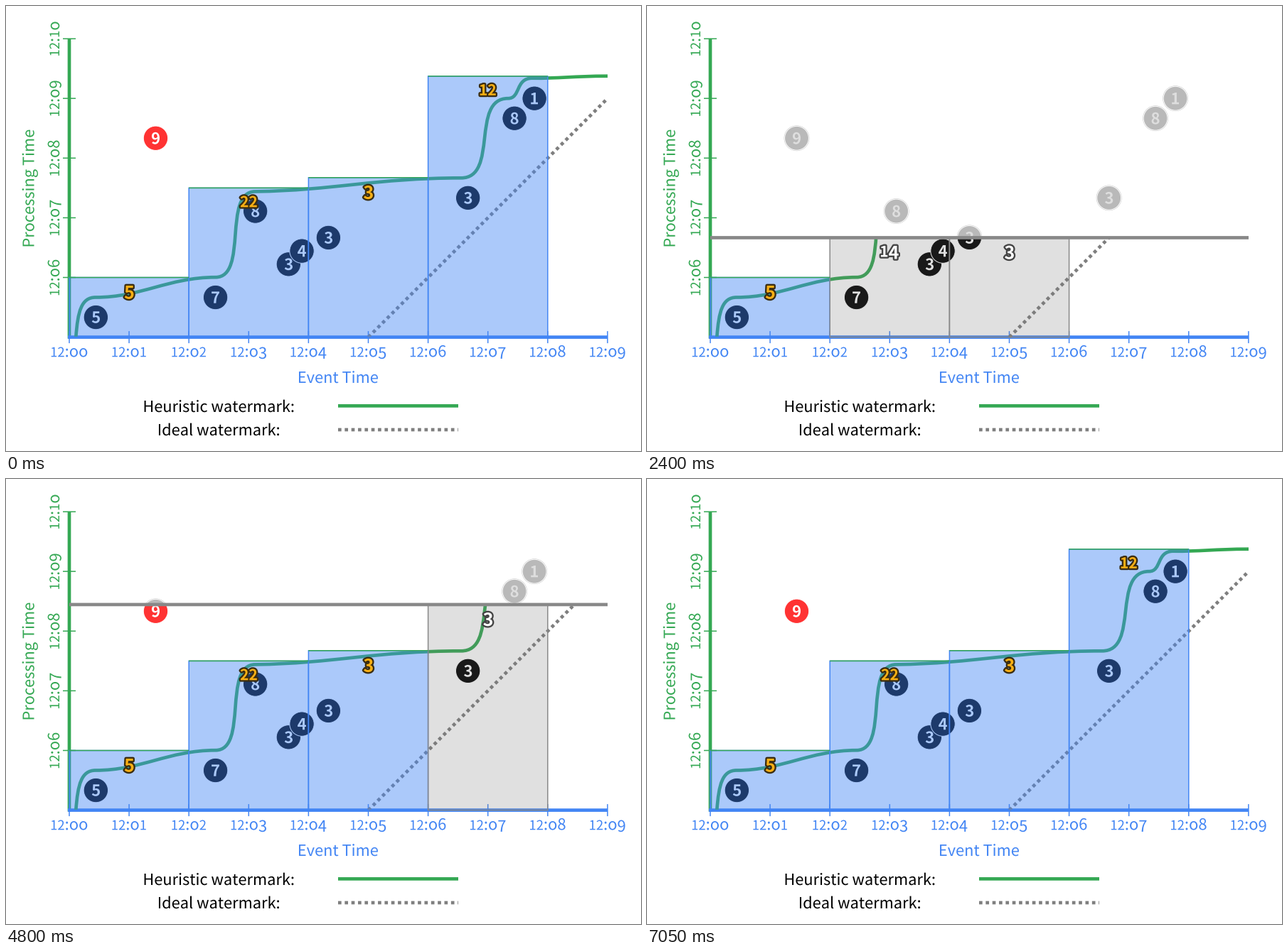
Animation of 893 by 627 pixels, one loop 8000 ms. Source, as a matplotlib script:

```python
import matplotlib.pyplot as plt
from matplotlib.animation import FuncAnimation
from matplotlib.patches import Circle, PathPatch, Rectangle
from matplotlib.patheffects import withStroke
from matplotlib.path import Path
from matplotlib.textpath import TextPath
from matplotlib.transforms import Affine2D

W, H, DPI = 893, 627, 64
PT = 72 / DPI                   # points per pixel
X0, Y0, MINUTE = 89, 466.6, 84.1
UNIT = MINUTE / 9               # the bar climbs one unit per step
THICK, THIN = UNIT / 2, 1.5
RIGHT, TOP = 846, Y0 - 45 * UNIT
STEP_MS, TICK_MS, LOOP_MS = 150, 50, 8000
LAST_STEP = 47

GREEN, BLUE, GREY = "#34a853", "#4285f4", "#888888"
FONT = "Noto Sans CJK JP"

# value, event time and arrival in units, window index (None: too late)
SAMPLES = [
    (5, 4, 3, 0), (7, 22, 6, 1), (3, 33, 11, 1), (4, 35, 13, 1),
    (3, 39, 15, 2), (8, 28, 19, 1), (3, 60, 21, 3), (9, 13, 30, None),
    (8, 67, 33, 3), (1, 70, 36, 3),
]
CLOSES = [9, 22.5, 24.06, 39.35]

fig = plt.figure(figsize=(W / DPI, H / DPI), dpi=DPI, facecolor="white")
ax = fig.add_axes([0, 0, 1, 1])
ax.set_xlim(0, W)
ax.set_ylim(H, 0)
ax.axis("off")


def raw(s, size, bold):
    prop = {"family": FONT, "weight": "bold" if bold else "normal"}
    return TextPath((0, 0), s, size=size, prop=prop)


def advance(c, size, bold):
    wide = raw("0" + c + "0", size, bold).get_extents().x1
    return wide - raw("00", size, bold).get_extents().x1


def flip_centred(path):
    box = path.get_extents()
    return Affine2D().translate(-(box.x0 + box.x1) / 2, 0).scale(1, -1).transform_path(path)


def plain(s, size, bold=False):
    return flip_centred(raw(s, size, bold))


def old_style(s, size, bold=False):
    """Digits with old-style heights: low 0-2, hanging 3, 4, 5, 7, 9."""
    parts, x = [], 0
    for c in s:
        scale = 0.84 if c in "12" else 1
        drop = 0.12 * size if c in "34579" else 0
        glyph = "o" if c == "0" else c
        path = raw(glyph, size * scale, bold)
        parts.append(Affine2D().translate(x, -drop).transform_path(path))
        x += advance(glyph, size * scale, bold)
    return flip_centred(Path.make_compound_path(*parts))


def place(path, x, y, color, angle=0, z=5):
    move = Affine2D().rotate_deg(angle).translate(x, y)
    patch = PathPatch(path, fc=color, lw=0, zorder=z, transform=move + ax.transData)
    return ax.add_patch(patch)


def line(xs, ys, color, width, z, **kw):
    kw.setdefault("solid_capstyle", "butt")
    return ax.plot(xs, ys, color=color, lw=width * PT, zorder=z, snap=False, **kw)[0]


def dotted(xs, ys, z):
    return line(xs, ys, "#7f7f7f", THICK, z, ls=(0, (1, 1)), dash_capstyle="butt")


# axes, ticks and their labels
line([X0, X0], [TOP, Y0 + 2], GREEN, THICK, 1)
line([X0 - 2, RIGHT], [Y0, Y0], BLUE, THICK, 1)
for i in range(10):
    x = X0 + i * MINUTE
    line([x, x], [Y0 - 8.5, Y0 + 8.5], BLUE, THIN, 1)
    place(old_style(f"12:0{i}", 22), x, 494.3, BLUE)
for i in range(1, 6):
    y = Y0 - i * MINUTE
    line([X0 - 9, X0 + 9], [y, y], GREEN, THIN, 1)
    place(old_style(f"12:{5 + i:02d}", 22), 75, y, GREEN, -90)
place(plain("Event Time", 21.8), 467.5, 531, BLUE)
place(plain("Processing Time", 21.8), 39.5, 256.5, GREEN, -90)

# legend
place(plain("Heuristic watermark:", 21.8), 299.5, 572, "black")
place(plain("Ideal watermark:", 21.8), 299.5, 605, "black")
line([467, 636], [563.4, 563.4], GREEN, THICK, 1)
dotted([467, 636], [597, 597], 1)

# watermarks, uncovered by the rising bar
knots = [
    (98.3, 466.6),
    (101, 430), (106, 410.5), (126, 410.5),
    (190, 410.5), (228, 382.4), (294.6, 382.2),
    (341, 382.2), (304, 261.4), (350.6, 261.4),
    (460, 260), (520, 242.3), (640, 242.3),
    (693, 242.3), (653, 130.2), (706, 130.2),
    (724, 130.2), (716, 101.7), (740, 101.7),
    (775, 102.3), (800, 98.7), (RIGHT, 98.7),
]
curve = Path(knots, [Path.MOVETO] + [Path.CURVE4] * (len(knots) - 1))
heuristic = ax.add_patch(PathPatch(curve, fc="none", ec=GREEN, lw=THICK * PT,
                                   capstyle="butt", zorder=2))
ideal = dotted([X0 + 5 * MINUTE, RIGHT], [Y0, Y0 - 4 * MINUTE], 2)
below, above = [heuristic, ideal], []


def disc(x, y, r, fill, z, edge="none"):
    return ax.add_patch(Circle((x, y), r, fc=fill, ec=edge, lw=PT, zorder=z))


for n, (value, event, arrival, win) in enumerate(SAMPLES):
    x, y, z = X0 + event * UNIT, Y0 - arrival * UNIT, 3 + n * 0.01
    digit = plain(str(value), 22, True)
    box = digit.get_extents()
    base = y - (box.y0 + box.y1) / 2
    above += [
        disc(x, y, 17.9, "#c6c6c6", z),
        disc(x, y, 16.9, "#b9b9b9", z, "white"),
        place(digit, x, base, "#dedede", z=z),
    ]
    below += [
        disc(x, y, 17.2, "#ff3333" if win is None else "black", z, "white"),
        place(digit, x, base, "white", z=z),
    ]


class Window:
    open_look = ((0.46, 0.46, 0.46, 0.22), GREY, "white", "#434343")
    closed_look = ((0.259, 0.522, 0.957, 0.444), BLUE, "#fbb014", "#3a2d12")

    def __init__(self, index):
        self.close = CLOSES[index]
        self.items = [(s[2], s[0]) for s in SAMPLES if s[3] == index]
        left, width = X0 + 2 * index * MINUTE, 2 * MINUTE
        self.mid = left + width / 2
        self.rect = ax.add_patch(Rectangle((left, Y0), width, 0, lw=0,
                                           snap=False, zorder=4))
        self.frame = ax.add_patch(Rectangle((left, Y0), width, 0, fc="none",
                                            lw=THIN * PT, snap=False, zorder=4.1))
        top = Y0 - self.close * UNIT
        self.lid = line([left, left + width], [top, top], GREEN, THIN, 4.2)
        self.label = place(plain("0", 25), 0, 0, "white", z=6)

    def update(self, level):
        total = sum(v for arrival, v in self.items if arrival <= level)
        closed = level >= self.close
        for part in (self.rect, self.frame, self.label):
            part.set_visible(total > 0)
        self.lid.set_visible(closed)
        if not total:
            return
        top = Y0 - min(level, self.close) * UNIT
        fill, edge, ink, outline = self.closed_look if closed else self.open_look
        for part in (self.rect, self.frame):
            part.set_y(top)
            part.set_height(Y0 - top)
        self.rect.set_facecolor(fill)
        self.frame.set_edgecolor(edge)
        self.label.set_path(number(total))
        self.label.set_transform(Affine2D().translate(self.mid, top + 27) + ax.transData)
        self.label.set_facecolor(ink)
        self.label.set_path_effects(
            [withStroke(linewidth=THICK * PT, foreground=outline, joinstyle="round")])


cache = {}


def number(n):
    if n not in cache:
        cache[n] = old_style(str(n), 25, True)
    return cache[n]


windows = [Window(i) for i in range(len(CLOSES))]
bar = line([X0, RIGHT], [Y0, Y0], GREY, THICK, 5)
bar.set_clip_path(Rectangle((X0, TOP), RIGHT - X0, H - TOP, transform=ax.transData))


def band(y0, y1):
    return Rectangle((0, y0), W, y1 - y0, transform=ax.transData)


def draw(i):
    step = min(i * TICK_MS // STEP_MS, LAST_STEP)
    running = 0 < step < LAST_STEP
    level = step - 1 if running else 45
    y = Y0 - level * UNIT
    bar.set_visible(running)
    bar.set_ydata([y, y])
    lower, upper = band(y, Y0 + 1), band(0, y)
    for part in below:
        part.set_clip_path(lower)
    for part in above:
        part.set_clip_path(upper)
    for window in windows:
        window.update(level)
    return []


anim = FuncAnimation(fig, draw, frames=LOOP_MS // TICK_MS, interval=TICK_MS,
                     repeat=True, repeat_delay=0, blit=False)
plt.show()
```
